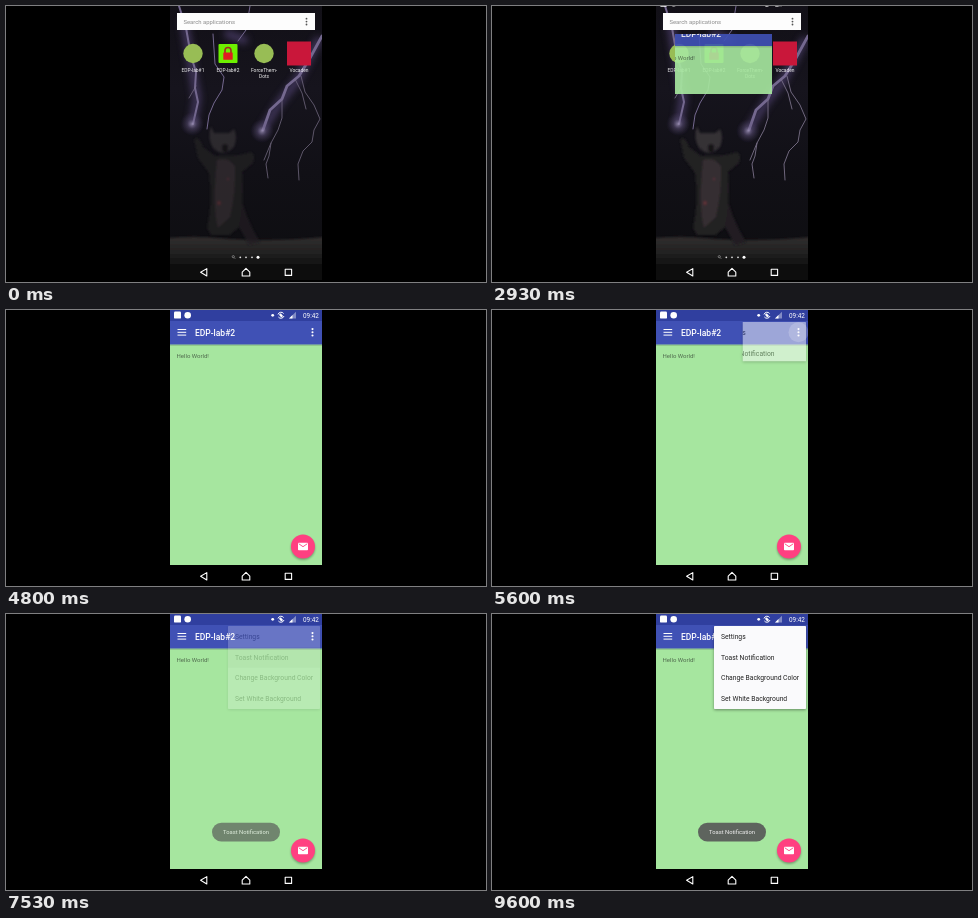
Animation of 480x276 px, one loop 9.79 s. Source, as an HTML page:

```html
<!DOCTYPE html>
<html lang="en">
<head>
<meta charset="utf-8">
<title>Phone demo</title>
<style>
html, body { margin: 0; width: 100%; height: 100%; overflow: hidden; background: #000; }
#stage { position: relative; width: 480px; height: 276px; overflow: hidden; font-family: Roboto, sans-serif; }
.layer { position: absolute; inset: 0; }
.layer svg { position: absolute; left: 0; top: 0; display: block; }
#phone { clip-path: inset(0 164px 0 164px); }
.label { font-size: 4.9px; fill: #f4f4f4; text-anchor: middle; }
.bolt { fill: none; stroke-linejoin: round; stroke-linecap: round; }
#menu { filter: drop-shadow(0 1px 1.5px rgba(0,0,0,.4)); }
#menu text { font-size: 6.75px; fill: #222; }
</style>
</head>
<body>
<div id="stage"><div id="phone" class="layer">

<div class="layer"><svg width="480" height="276">
  <defs>
    <linearGradient id="sky" x2="0" y2="1">
      <stop offset="0" stop-color="#121017"/><stop offset=".3" stop-color="#16141d"/>
      <stop offset=".6" stop-color="#111016"/><stop offset="1" stop-color="#0d0d10"/>
    </linearGradient>
    <linearGradient id="ground" x2="0" y2="1">
      <stop offset="0" stop-color="#302e2e"/><stop offset=".3" stop-color="#232222"/>
      <stop offset=".6" stop-color="#0f0f0f"/><stop offset="1" stop-color="#030303"/>
    </linearGradient>
    <radialGradient id="glow">
      <stop offset="0" stop-color="#a79cc0" stop-opacity=".75"/>
      <stop offset=".4" stop-color="#6b5f88" stop-opacity=".35"/>
      <stop offset="1" stop-color="#594c78" stop-opacity="0"/>
    </radialGradient>
    <filter id="soft"><feGaussianBlur stdDeviation="1"/></filter>
    <filter id="wide" x="-20%" width="140%"><feGaussianBlur stdDeviation="3.5"/></filter>
  </defs>
  <rect x="164" width="152" height="276" fill="url(#sky)"/>
  <path d="M160 232Q190 230 212 232T262 234T320 231V280H160Z" fill="url(#ground)" filter="url(#soft)"/>
  <g class="bolt" stroke="#56477a" stroke-width="8" opacity=".65" filter="url(#wide)">
    <path d="M178 15L186 62 191 92 187 118M312 35L290 76 274 96 256 125M222 28L238 34"/>
  </g>
  <g class="bolt" stroke="#74688f" stroke-width="1.2">
    <path stroke-width="2" d="M173 0L180 22 185 50 190 66 189 82 192 96 187 118"/>
    <path stroke-width="1" d="M244 0L240 24 232 35M207 28L209 58 218 71 216 84 208 97 203 109 201 123"/>
    <path stroke-width="2.8" d="M316 30L304 52 293 70 281 80 276 93 264 104 257 124"/>
  </g>
  <g id="forks" class="bolt" stroke="#7a7188" stroke-width=".9">
    <path d="M276 94L276 112 272 124 265 137 263 150 260 158 262 172"/>
    <path d="M265 137L258 154"/>
    <path d="M295 70L299 86 308 99 314 113 308 124 306 136 297 145 292 158 293 174"/>
    <path d="M289 73L296 87 300 103"/>
    <path d="M190 80L183 92"/>
  </g>
  <g id="cat" filter="url(#soft)">
    <path d="M233 182Q238 210 254 236L243 239 227 210Z" fill="#211f24"/>
    <path d="M188 133Q193 129 197 141L209 150 233 149 245 146Q250 149 247 157L236 166Q239 190 233 221L224 229H205L201 222Q207 195 203 167L192 152Z" fill="#242124"/>
    <path d="M208 127L205 120Q201 132 207 142 217 152 228 141 232 131 228 123L223 127Z" fill="#343034"/>
    <path d="M211 154Q223 150 229 161 230 185 224 211L212 222Q206 200 211 154Z" fill="#352f31"/>
    <ellipse cx="219" cy="142" rx="3" ry="4" fill="#141216"/>
    <g fill="#69303a"><circle cx="222" cy="173" r="1"/><circle cx="213" cy="197" r="1.7"/></g>
  </g>
  <circle cx="186" cy="118" r="12" fill="url(#glow)"/>
  <circle cx="256" cy="125" r="12" fill="url(#glow)"/>

  <rect x="171" y="7" width="138" height="17" fill="#fdfdfd"/>
  <text x="177.5" y="18" font-size="5.9" fill="#8a8a8a">Search applications</text>
  <g fill="#555"><circle cx="300.5" cy="12.7" r=".9"/><circle cx="300.5" cy="15.6" r=".9"/><circle cx="300.5" cy="18.5" r=".9"/></g>
  <circle cx="187" cy="47.5" r="9.7" fill="#98bd55"/>
  <circle cx="258" cy="47.5" r="9.7" fill="#98bd55"/>
  <rect x="212.5" y="38" width="19" height="19" rx="1" fill="#6df000"/>
  <path d="M219 47V44.5a3 3 0 0 1 6 0V47" fill="none" stroke="#a52b20" stroke-width="1.6"/>
  <rect x="217.3" y="46.5" width="9.4" height="7.3" rx=".6" fill="#e01b22"/>
  <rect x="281" y="35.5" width="24" height="24" fill="#c9173a"/>
  <g id="labels" class="label">
    <text x="187" y="66">EDP-lab#1</text><text x="222" y="66">EDP-lab#2</text>
    <text x="258" y="66">ForceThem-</text><text x="258" y="72">Dots</text>
    <text x="293" y="66">Vocaden</text>
  </g>
  <g fill="#ddd">
    <circle cx="227.3" cy="250.7" r="1.1" fill="none" stroke="#aaa" stroke-width=".6"/>
    <path d="M228 251.5l1.3 1.3" stroke="#aaa" stroke-width=".6"/>
    <circle cx="234.3" cy="251.3" r=".9"/><circle cx="240" cy="251.3" r=".9"/>
    <circle cx="246" cy="251.3" r=".9"/><circle cx="252" cy="251.3" r="1.5" fill="#fff"/>
  </g>
</svg></div>

<div id="win" class="layer"><div id="app" class="layer"><svg width="480" height="276">
  <rect x="164" width="152" height="255" fill="#a6e69f"/>
  <rect x="164" y="34.5" width="152" height="1.5" fill="#000" opacity=".13"/>
  <rect x="164" y="11" width="152" height="23.5" fill="#4051b5"/>
  <rect x="164" width="152" height="11" fill="#303f9f"/>
  <path d="M171.5 19.5h8.7M171.5 22.3h8.7M171.5 25.1h8.7" stroke="#fff"/>
  <text x="189" y="25.7" font-size="8.5" font-weight="500" fill="#fff">EDP-lab#2</text>
  <circle id="ripple" cx="306.5" cy="22.3" r="10" fill="#fff"/>
  <g fill="#fff"><circle cx="306.5" cy="19.1" r="1.05"/><circle cx="306.5" cy="22.3" r="1.05"/><circle cx="306.5" cy="25.5" r="1.05"/></g>
  <text x="170.5" y="48" font-size="6" fill="#506b4e">Hello World!</text>
  <circle cx="297" cy="238" r="12" fill="#000" opacity=".3" filter="url(#soft)"/>
  <circle cx="297" cy="236.5" r="12" fill="#ff4081"/>
  <rect x="292" y="232.7" width="10" height="7.6" rx=".8" fill="#fff"/>
  <path d="M292.8 233.8L297 236.7 301.2 233.8" fill="none" stroke="#ff4081" stroke-width=".9"/>
</svg></div></div>

<div id="status" class="layer"><svg width="480" height="12">
  <g fill="#fff">
    <rect x="168" y="1.6" width="7" height="7" rx="1.2"/>
    <circle cx="181.7" cy="5.2" r="3.3"/>
    <circle cx="266.7" cy="5.3" r="1.4"/>
    <path d="M272 4.5a3.2 3.2 0 0 1 5.6-1M278 6a3.2 3.2 0 0 1-5.6 1" fill="none" stroke="#fff"/>
    <rect x="273.8" y="3.5" width="2.4" height="3.6" transform="rotate(-40 275 5.3)"/>
    <path d="M283 8.5L290 1.7V8.5Z" opacity=".4"/><path d="M283 8.5L286.5 5.1V8.5Z"/>
    <text x="297" y="7.7" font-size="6.4">09:42</text>
  </g>
</svg></div>

<div id="toast" class="layer"><svg width="480" height="276">
  <rect x="206" y="208.7" width="68" height="18.8" rx="9.4" fill="#5e645e"/>
  <text x="240" y="220.2" font-size="5.8" fill="#f3f3f3" text-anchor="middle">Toast Notification</text>
</svg></div>

<div id="menu" class="layer"><div id="reveal" class="layer"><svg width="480" height="276">
  <rect x="222" y="12" width="92" height="83" rx=".8" fill="#fafafc"/>
  <rect id="press" x="222" y="33" width="92" height="20.7"/>
  <g id="items"></g>
</svg></div></div>

<div id="navbg" class="layer"><svg width="480" height="276"><rect x="164" y="255" width="152" height="21"/></svg></div>
<div class="layer"><svg width="480" height="276">
  <g fill="none" stroke="#fff" stroke-width="1.1" stroke-linejoin="round">
    <path d="M194.6 266.3L200.8 262.6V270Z"/>
    <path d="M236.2 266.2L240 262.4 243.8 266.2V270H236.2Z"/>
    <rect x="279.2" y="263.2" width="6.4" height="6.2"/>
  </g>
</svg></div>

</div></div>
<script>
const LOOP = 9790;
const $ = id => document.getElementById(id);

["Settings", "Toast Notification", "Change Background Color", "Set White Background"].forEach((name, i) => {
  const t = document.createElementNS("http://www.w3.org/2000/svg", "text");
  t.setAttribute("x", 229);
  t.setAttribute("y", 25 + i * 20.7);
  t.textContent = name;
  $("items").append(t);
});

// steps: [ms, value] pairs, held before the first and after the last
function play(id, prop, steps, format = String) {
  const all = [[0, steps[0][1]], ...steps, [LOOP, steps[steps.length - 1][1]]];
  const frames = all.map(([ms, v]) => ({ offset: ms / LOOP, [prop]: format(v) }));
  $(id).animate(frames, { duration: LOOP, iterations: Infinity });
}
const shiftY = y => `translateY(${y}px)`;
const blur = r => `blur(${r}px)`;
const box = ([l, t, r, b]) => `inset(${t}px ${480 - r}px ${276 - b}px ${l}px)`;

// Launcher sharpens
play("cat", "opacity", [[0, .75], [1000, 1]]);
play("forks", "opacity", [[0, .8], [1000, 1]]);
play("labels", "filter", [[0, .3], [600, 0]], blur);

// App window opens out of its icon
const peek = [183, 28.5, 279.5, 88.5];
play("win", "opacity", [[2840, 0], [2930, .92], [3000, 1]]);
play("win", "clipPath", [
  [2840, [211, 36, 233, 59]], [2930, peek], [2965, peek], [3000, [172, 14, 300, 152]],
  [3070, [167, 5, 310, 207]], [3200, [164, 0, 316, 276]]
], box);
play("app", "transform", [[2840, 8], [2930, 5.5], [2965, 5.5], [3070, 1.5], [3200, 0]], shiftY);
play("status", "transform", [[2840, -12], [2930, -8], [3130, 0]], shiftY);
play("navbg", "opacity", [[2930, 0], [3200, 1]]);

// Overflow menu, twice
play("ripple", "opacity", [
  [5400, 0], [5470, .2], [5700, .2], [5900, 0], [9070, 0], [9140, .2], [9350, .2], [9500, 0]
]);
play("menu", "opacity", [
  [5530, 0], [5670, 1], [7400, 1], [7530, .22], [7600, 0], [9200, 0], [9330, 1]
]);
const shut = [270, 10, 318, 30], half = [232, 8, 320, 72], open = [216, 6, 320, 102];
play("reveal", "clipPath", [
  [5530, shut], [5670, half], [5830, open], [7700, open],
  [7700, shut], [9200, shut], [9330, half], [9470, open]
], box);
play("press", "opacity", [[7130, 0], [7260, .1], [7600, .1], [7700, 0]]);
play("toast", "opacity", [[7400, 0], [7530, .75], [7700, 1]]);
</script>
</body>
</html>
```
